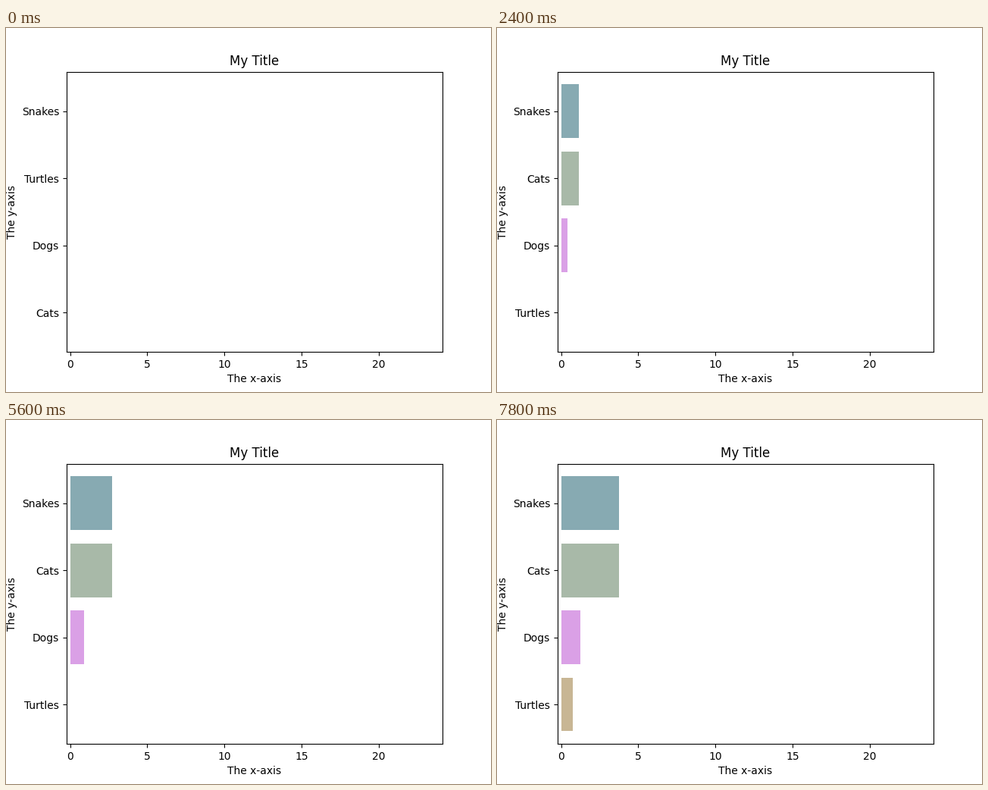
Animation of 640x480 px, one loop 8000 ms. Source, as a matplotlib script:

```python
import matplotlib.pyplot as plt
from matplotlib.animation import FuncAnimation

FRAMES, INTERVAL = 40, 200
STEPS = 31  # frames per data period

# name: (colour, amount gained per period, frame where growth starts)
ANIMALS = {
    "Cats": ("#a8b9a8", 3, 0),
    "Dogs": ("#daa0e6", 1, 0),
    "Turtles": ("#c8b694", 3, STEPS),
    "Snakes": ("#87aab2", 3, 0),
}


def value(name, frame):
    _, gain, start = ANIMALS[name]
    return gain * max(0, frame - start) / STEPS


plt.rcParams["font.family"] = "DejaVu Sans"
fig, ax = plt.subplots(figsize=(6.4, 4.8), dpi=100)
ranks = range(1, len(ANIMALS) + 1)
bars = ax.barh(ranks, [0] * len(ANIMALS), height=0.8, linewidth=0)
ax.set_xlim(-0.23, 24.15)
ax.set_ylim(0.41, 4.59)
ax.set_xticks(range(0, 21, 5))
ax.set_title("My Title")
ax.set_xlabel("The x-axis")
ax.set_ylabel("The y-axis")


def update(frame):
    # Stable sort: ties keep the listed order, largest ends on top.
    order = sorted(ANIMALS, key=lambda name: value(name, frame))
    for bar, name in zip(bars, order):
        width = value(name, frame)
        bar.set_width(width)
        bar.set_facecolor(ANIMALS[name][0])
        bar.set_visible(width > 0)
    ax.set_yticks(ranks, order)
    return bars


anim = FuncAnimation(fig, update, frames=FRAMES, interval=INTERVAL,
                     init_func=lambda: update(0), repeat=True, repeat_delay=0)
plt.show()
```
